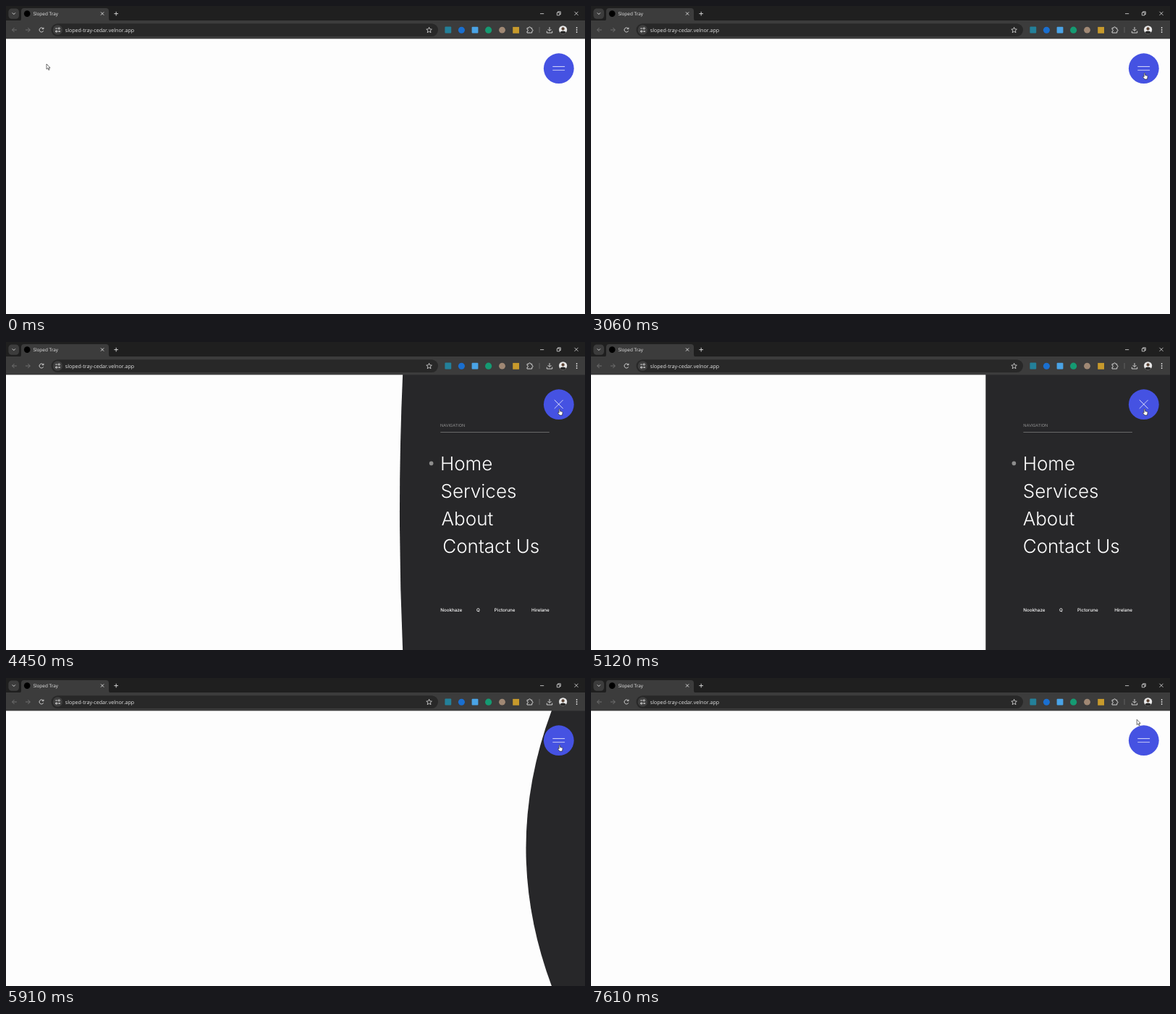
An HTML page that plays this animation: 800 by 425 pixels, repeating every 7640 ms.

```html
<!DOCTYPE html>
<html lang="en">
<head>
<meta charset="utf-8">
<title>Sloped Tray</title>
<style>
  html, body { margin: 0; width: 100%; height: 100%; overflow: hidden; background: #fdfdfd; }
  svg { display: block; width: 800px; height: 425px; }
  text { text-rendering: geometricPrecision; white-space: pre; }
  .ui { font-family: "Open Sans", "Noto Sans", sans-serif; fill: #e6e6e6; }
  .menu { font-family: Inter, "Liberation Sans", sans-serif; fill: #fff; }
  .link { font-size: 26px; font-weight: 300; }
  .small { font-size: 6.25px; font-weight: 500; }
  .icon { fill: none; stroke: #dedede; stroke-width: .9; }
  .dim { stroke: #767676; }
</style>
</head>
<body>
<svg viewBox="0 0 800 425">
  <rect width="800" height="425" fill="#fdfdfd"/>

  <g id="panel" class="menu">
    <path id="curve" fill="#272729"/>
    <text x="51.9" y="117.1" font-size="5.6" fill="#8f8f8f">NAVIGATION</text>
    <path d="M52.1 124.5H202.6" stroke="#858585" stroke-width=".7"/>
    <g id="links"></g>
    <g class="small">
      <text x="52" y="371.8">Nookhaze</text>
      <text x="101.8" y="371.8">Q</text>
      <text x="126.7" y="371.8">Pictorune</text>
      <text x="202.6" y="371.8" text-anchor="end">Hirelane</text>
    </g>
  </g>

  <g id="browser">
    <rect width="800" height="21" fill="#1f1f1f"/>
    <rect y="20" width="800" height="25.3" fill="#3c3c3c"/>
    <path d="M18 20.5Q21 20.5 21 17V7Q21 3 25 3H138Q142 3 142 7V17Q142 20.5 145 20.5Z" fill="#3c3c3c"/>
    <rect x="3.4" y="3.4" width="14.6" height="14.4" rx="4.5" fill="#3c3c3c"/>
    <rect x="62.5" y="24.2" width="534.5" height="17.8" rx="8.9" fill="#282828"/>
    <circle cx="71.4" cy="33" r="6.7" fill="#3f3f3f"/>
    <circle cx="29.2" cy="10.6" r="4.3" fill="#000"/>
    <text class="ui" x="37.4" y="12.9" font-size="6.4">Sloped Tray</text>
    <text class="ui" x="81.8" y="35.6" font-size="7.1">sloped-tray-cedar.velnor.app</text>

    <g class="icon">
      <path d="M8.7 9.4L10.8 11.5 12.9 9.4"/>
      <path d="M131 8.4L135.2 12.6M135.2 8.4L131 12.6M149.4 10.6H155M152.2 7.8V13.4"/>
      <path class="dim" d="M14.8 33H8.6M11.5 30L8.5 33 11.5 36M27 33H33.2M30.3 30L33.3 33 30.3 36"/>
      <path d="M51.6 31.4A3 3 0 1 0 51.7 34.3M51.9 29.7V31.7H49.8"/>
      <path d="M68.2 31H71.2M73.2 35H75M68 35H69.5M71.8 35H74.9"/>
      <circle cx="73.3" cy="31" r="1.1"/><circle cx="69.8" cy="35" r="1.1"/>
      <path d="M584.6 29.3L585.7 31.9 588.4 32.1 586.3 33.9 587 36.7 584.6 35.2 582.2 36.7 582.9 33.9 580.8 32.1 583.5 31.9Z" stroke-width=".8"/>
      <path d="M720 30.3H722.2Q722.2 28.8 723.5 28.8T724.8 30.3H726.7V32.3Q728 32.3 728 33.6T726.7 34.9V37H720V34.9Q721.4 34.9 721.4 33.6T720 32.3Z"/>
      <path d="M737 29V37" stroke="#666"/>
      <path d="M751 29V34.2M748.5 32L751 34.5 753.5 32M747.3 34.6V37H754.7V34.6"/>
      <path d="M738 10.6H743.2M785.5 7.8L790.5 12.8M790.5 7.8L785.5 12.8" stroke-width=".8"/>
      <path d="M761.3 9H765V12.8H761.3ZM762.6 9V7.8H766.3V11.5H765" stroke-width=".8"/>
    </g>

    <rect x="606.4" y="28.6" width="8.8" height="8.8" rx="1" fill="#23809a"/>
    <circle cx="629.4" cy="33.2" r="4.5" fill="#1a6fd0"/>
    <rect x="643.6" y="28.8" width="8.8" height="8.8" rx="1" fill="#4aa3e6"/>
    <circle cx="666.6" cy="33.2" r="4.6" fill="#159a72"/>
    <circle cx="685.5" cy="33.2" r="4.4" fill="#a08874"/>
    <rect x="700.2" y="28.9" width="8.8" height="8.8" fill="#c79a2c"/>
    <clipPath id="face"><circle cx="769.6" cy="32.8" r="5.6"/></clipPath>
    <g clip-path="url(#face)">
      <rect x="763" y="26" width="13" height="13" fill="#e8e8e8"/>
      <circle cx="769.6" cy="31.4" r="2.1" fill="#5b4334"/>
      <ellipse cx="769.6" cy="38.2" rx="4.8" ry="3.7" fill="#272727"/>
    </g>
    <g fill="#dedede">
      <circle cx="788.6" cy="30" r=".9"/><circle cx="788.6" cy="33" r=".9"/><circle cx="788.6" cy="36" r=".9"/>
    </g>
  </g>

  <circle cx="763.8" cy="86.2" r="20.9" fill="#4552e2"/>
  <g stroke="#fff" stroke-width=".8">
    <path id="barA" d="M-8.4 0H8.4"/>
    <path id="barB" d="M-8.4 0H8.4" stroke-opacity=".85"/>
  </g>

  <g id="cursor" fill="#fff" stroke="#222" stroke-width=".65" stroke-linejoin="round">
    <path id="arrow" d="M0 0V7.2L1.7 5.7 2.9 8.4 4.1 7.9 2.9 5.3H5Z"/>
    <path id="hand" d="M-.3.6Q.5-.4 1.2.6V3.3L4.2 4.1Q4.8 4.4 4.7 5.3L4.1 8.9H.6L-1.9 5.8Q-1.9 4.5-.8 5L-.3 5.6Z"/>
  </g>
</svg>

<script>
const LOOP = 7640;
const OPEN = 3740, CLOSE = 5440;
const WIDTH = 254.7, BULGE = 52.1, LINK_SHIFT = 41.7;
const TOP = 45, BOTTOM = 425;

const OPEN_CLOCK = [[OPEN, 0], [3940, 200], [4030, 255], [4450, 705], [4750, 1005]];
const CLOSE_CLOCK = [[CLOSE, 0], [5640, 190], [5910, 438], [6500, 1028]];

const $ = id => document.getElementById(id);
const clamp = v => Math.min(1, Math.max(0, v));
const lerp = (a, b, p) => a + (b - a) * p;
const smooth = p => p * p * (3 - 2 * p);
const move = (el, x, y, extra = "") => el.setAttribute("transform", `translate(${x} ${y}) ${extra}`);

function bezier(x1, y1, x2, y2) {
  const at = (a, b, s) => 3 * (1 - s) ** 2 * s * a + 3 * (1 - s) * s * s * b + s ** 3;
  return x => {
    if (x <= 0 || x >= 1) return clamp(x);
    let lo = 0, hi = 1;
    for (let i = 0; i < 24; i++) {
      const mid = (lo + hi) / 2;
      if (at(x1, x2, mid) < x) lo = mid; else hi = mid;
    }
    return at(y1, y2, lo);
  };
}
const swing = bezier(.76, 0, .24, 1);
const ease = bezier(.25, .1, .25, 1);

function clock(points, t) {
  if (t <= points[0][0]) return 0;
  for (let i = 1; i < points.length; i++) {
    const [a, va] = points[i - 1], [b, vb] = points[i];
    if (t < b) return lerp(va, vb, (t - a) / (b - a));
  }
  return points[points.length - 1][1];
}

const links = ["Home", "Services", "About", "Contact Us"].map((label, i) => {
  const g = document.createElementNS("http://www.w3.org/2000/svg", "g");
  const dot = i ? "" : '<circle cx="-13" cy="167.4" r="2.8" fill="#8d8d8d"/>';
  g.innerHTML = `${dot}<text class="link" x="-.7" y="${177.4 + 38 * i}">${label}</text>`;
  $("links").append(g);
  return g;
});

function drawMenu(t) {
  const closing = t >= CLOSE;
  const ms = clock(closing ? CLOSE_CLOCK : OPEN_CLOCK, t);
  // How far away from the open state a part is: 1 hidden, 0 open.
  const away = (duration, delay = 0) => {
    const p = swing((ms - delay) / duration);
    return closing ? p : 1 - p;
  };
  const bulge = 2 * BULGE * away(closing ? 800 : 1000);
  move($("panel"), 800 - WIDTH + (WIDTH + BULGE) * away(800), 0);
  $("curve").setAttribute("d",
    `M0 ${TOP}H320V${BOTTOM}H0Q${-bulge} ${(TOP + BOTTOM) / 2} 0 ${TOP}Z`);
  links.forEach((g, i) => move(g, BULGE + LINK_SHIFT * away(800, 50 * i), 0));
}

function drawBurger(t) {
  const p = t < CLOSE ? ease((t - OPEN) / 300) : 1 - ease((t - CLOSE) / 300);
  move($("barA"), 763.7, lerp(83.6, 85.9, p), `rotate(${45 * p})`);
  move($("barB"), 763.7, lerp(88.6, 85.9, p), `rotate(${-45 * p})`);
}

function drawCursor(t) {
  const arrive = smooth(clamp((t - 1150) / 1450));
  const leave = smooth(clamp((t - 6600) / 800));
  const arc = p => 4 * p * (1 - p);
  const x = lerp(56, 764.4, arrive) - 10.2 * leave + 6 * arc(leave);
  const y = lerp(80, 92.2, arrive) + 15.6 * arc(arrive) - 34.9 * leave;
  const over = Math.hypot(x - 763.8, y - 86.2) < 20.9;
  $("hand").style.display = over ? "" : "none";
  $("arrow").style.display = over ? "none" : "";
  move($("cursor"), x, y);
}

const start = performance.now();
function frame() {
  const t = (performance.now() - start) % LOOP;
  drawMenu(t);
  drawBurger(t);
  drawCursor(t);
  requestAnimationFrame(frame);
}
frame();
</script>
</body>
</html>
```
